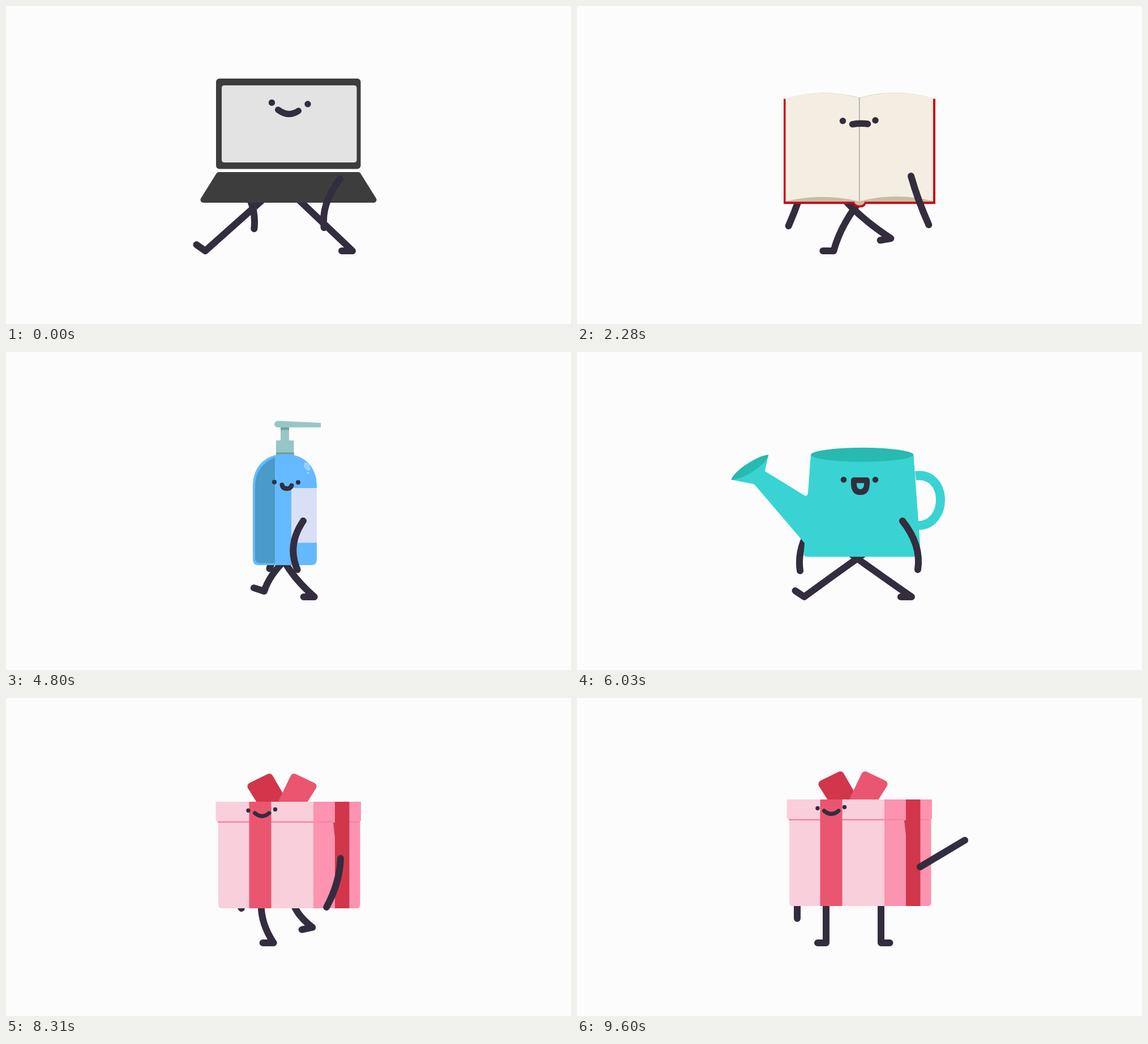
Recreate the animation shown at these times as an HTML page. Size 998x561 px, loop 9630 ms.

```html
<!DOCTYPE html>
<html lang="en">
<head>
<meta charset="utf-8">
<title>Walking things</title>
<style>
html, body { margin: 0; width: 100%; height: 100%; overflow: hidden; background: #fcfcfc; }
svg { display: block; width: 998px; height: 561px; }
.limb { fill: none; stroke: #332d3e; stroke-width: 12; stroke-linecap: round; stroke-linejoin: round; }
.face { fill: #332d3e; }
.face path { fill: none; stroke: #332d3e; stroke-linecap: round; stroke-linejoin: round; }
.round { stroke-linejoin: round; }
.body { display: none; }
</style>
</head>
<body>
<svg viewBox="0 0 998 561">
<g id="root">
  <path id="back" class="limb"/>

  <g id="laptop" class="body">
    <rect x="371" y="128" width="255.500" height="159.500" rx="6" fill="#3d3d3d"/>
    <rect x="381" y="140" width="238.500" height="136" rx="4.500" fill="#e3e3e3"/>
    <path class="round" d="M376 298H622L649.500 342H348.500Z" fill="#3d3d3d" stroke="#3d3d3d" stroke-width="10"/>
    <g class="face">
      <circle cx="469.500" cy="170.500" r="5.700"/><circle cx="533" cy="173" r="5.700"/>
      <path d="M480.500 183Q499 197 516.500 185" stroke-width="11"/>
    </g>
  </g>

  <g id="book" class="body">
    <path d="M365 142H633V327.500H510A10.500 6 0 0 1 488 327.500H365Z" fill="#c4071b"/>
    <path d="M369 323.500V142Q432 122 499 140Q563 122 629 141V323.500H508A9 6.500 0 0 1 490 323.500Z" fill="#c8bda4"/>
    <path d="M368.500 323V142Q432 122 499 140.500Q563 122 629 141V322Q560 306 499 323Q432 307 368.500 323Z" fill="#f4eee2"/>
    <path d="M498.800 140V323" stroke="#85837c"/>
    <g class="face">
      <circle cx="469.500" cy="181" r="5.700"/><circle cx="527" cy="180" r="5.700"/>
      <path d="M486.500 186.800Q500 184.500 513.500 186.200" stroke-width="11.500"/>
    </g>
  </g>

  <g id="bottle" class="body">
    <path d="M485 132H500V157H485Z M477 156H508.500V182H477Z" fill="#97c7c5"/>
    <path d="M485 133H500V137.500H485Z M477 177H508.500V182H477Z" fill="#719f9f"/>
    <path d="M480 121.500L556 125V133H479.500A5.700 5.700 0 0 1 480 121.500Z" fill="#97c7c5"/>
    <path d="M436 237C436 202 458 180 492.500 180S549 202 549 237V366Q549 376 539 376H446Q436 376 436 366Z" fill="#65b9fe"/>
    <path d="M475 186V372.500H449Q440 372 440 363V237Q440 201 475 186Z" fill="#4a9aca"/>
    <path d="M504 240H549V336.500H504Z" fill="#d9dff5"/>
    <g fill="#93d2fb">
      <ellipse cx="532" cy="202" rx="5" ry="8" transform="rotate(-30 532 202)"/>
      <circle cx="533.500" cy="213.500" r="2"/>
    </g>
    <g class="face">
      <circle cx="474" cy="229.500" r="4"/><circle cx="516" cy="230" r="4"/>
      <path d="M487.500 234.500Q489 241 496 241T504.500 235.500" stroke-width="8"/>
    </g>
  </g>

  <g id="can" class="body">
    <path d="M598 218C656 211 656 306 602 306" fill="none" stroke="#3ad3d3" stroke-width="16"/>
    <path d="M413 181H594.500L607 354Q607 361 600 361H407Q400 361 400.500 354L402 337L313 233L272.500 225L338 181L332 210L402 253Q407 255 408 248Z" fill="#3ad3d3"/>
    <path d="M272.500 225.500C274 212 318 182 338 181C340 192 300 224 272.500 225.500Z" fill="#28b9b0"/>
    <ellipse cx="503.700" cy="181" rx="90.500" ry="12.500" fill="#28b9b0"/>
    <g class="face">
      <circle cx="471" cy="225" r="5.300"/><circle cx="527" cy="225" r="5.300"/>
      <path d="M489 226H512V234Q511 247 500.500 247T489 234Z" stroke-width="10"/>
    </g>
  </g>

  <g id="gift" class="body">
    <path class="round" d="M433.500 152L465 136.500L482 166L480 178H450Z" fill="#d1364b" stroke="#d1364b" stroke-width="14"/>
    <path class="round" d="M509 136.500L541.500 152L525 178H489Z" fill="#ea566f" stroke="#ea566f" stroke-width="14"/>
    <path d="M375 214H543V367H381Q375 367 375 361Z M370.500 179H543V214H374Q370.500 214 370.500 210Z" fill="#f9cfdc"/>
    <path d="M543 214H625.500V361Q625.500 367 619 367H543Z M543 179H627V211Q627 214 624 214H543Z" fill="#fc93b0"/>
    <path d="M374 213.500H624V216H374Z" fill="#f487a6"/>
    <path d="M429.500 179H468.500V367H429.500Z" fill="#ea566f"/>
    <path d="M581 179H606.500V367H581Z M578 216H582V250Z" fill="#d1364b"/>
    <g class="face">
      <circle cx="425" cy="194.500" r="3.700"/><circle cx="472.500" cy="192.500" r="3.700"/>
      <path d="M436.500 199Q449 210 462 199" stroke-width="7"/>
    </g>
  </g>

  <path id="front" class="limb"/>
</g>
</svg>
<script>
const FRAME = 30, LOOP = 321 * FRAME, TURN = 64, STEP = 245, GROUND = 432;
const $ = id => document.getElementById(id);
const { sin, cos, PI, min, max, floor } = Math;
const mix = (a, b, k) => a + (b - a) * k;
const mix2 = (p, q, k) => [mix(p[0], q[0], k), mix(p[1], q[1], k)];
const ease = (a, b, t) => { const k = min(1, max(0, (t - a) / (b - a))); return k * k * (3 - 2 * k); };
const rad = d => d * PI / 180;

// Pairs are [left, right]. wave: [arm, base angle, swing, bend].
const cast = [
  { id: 'laptop', mid: 482, stride: 130, hips: [461, 510], hipY: 335, stand: [440, 551],
    arms: [[410, 305], [590, 305]], rest: [[385, 298], [620, 300]], len: [103, 93],
    wave: [0, 103, 18, 32], tilt: () => 1.7, bob: 1, face: [0, -15] },
  { id: 'book', mid: 487, stride: 110, hips: [463, 511], hipY: 330, stand: [440, 551],
    arms: [[405, 300], [590, 300]], rest: [[382, 305], [611, 308]], len: [86, 102],
    wave: [1, 137, 18, 5], hop: 20, bob: 2, dy: 20 },
  { id: 'bottle', mid: 492, stride: 89, hips: [494, 490], hipY: 366, stand: [465, 520],
    arms: [[455, 294], [525, 298]], rest: [[457, 290], [525, 298]], len: [82, 80],
    wave: [1, 125, 18, 8], hop: 4, bob: 5, dy: -3, near: true },
  { id: 'can', mid: 495, stride: 100, hips: [475, 515], hipY: 350, stand: [469, 529],
    arms: [[421, 298], [575, 298]], rest: [[421, 300], [575, 298]], len: [92, 92],
    tilt: t => 9 * sin(PI * max(0, t - 990) / 450) ** 2, bob: 4, near: true },
  { id: 'gift', mid: 486, stride: 131, hips: [452, 505], hipY: 350, stand: [440, 537],
    arms: [[391, 283], [591, 283]], rest: [[389, 298], [606, 298]], len: [91, 92],
    wave: [1, 136, 16, 0], bob: 4, face: [3, 0], near: true }
];
for (const c of cast) {
  c.body = $(c.id);
  c.mouth = c.body.querySelector('.face');
}

const curve = (a, b, c) => `M${a}Q${b} ${c}`;

function leg(c, i, s, k) {
  const n = min(3, floor(s)), u = s - n, swing = n % 2 !== i;
  let x, y = GROUND, toe;
  if (swing) {
    const lift = sin(PI * u) ** 2;
    x = c.mid + c.stride * (1 - 2 * u ** 1.55);
    y -= 28 * lift;
    toe = 35 * u - 28 * lift;
  } else {
    x = c.mid + c.stride * (2 * u - 1);
    toe = 35 * max(0, 1 - u / 0.2);
  }
  const hip = [mix(c.hips[i], c.stand[i], k), c.hipY];
  const ankle = mix2([x, y], [c.stand[i], GROUND], k);
  const foot = mix2([-19 * cos(rad(toe)), -19 * sin(rad(toe))], [i ? 15.5 : -15, 0], k);
  const knee = mix2(hip, ankle, 0.5);
  knee[0] -= 17 * sin(PI * u) * (1 - k);
  return curve(hip, knee, ankle) + `L${ankle[0] + foot[0]} ${ankle[1] + foot[1]}`;
}

function arm(c, i, s, k, t) {
  const side = i ? 1 : -1;
  const from = mix2(c.arms[i], c.rest[i], k);
  const reach = 35 * cos(PI * (s - 0.2));
  const bow = 12 * cos(PI * (s + 0.2));
  let angle = 0, bend = 0;
  if (c.wave && c.wave[0] === i) {
    const [, base, swing, curl] = c.wave, up = ease(980, 1190, t);
    angle = rad(up * (base + swing * sin(2 * PI * (t - 1170) / 400)));
    bend = up * curl;
  }
  const walkHand = [-side * reach, i ? 86 : 88];
  const restHand = [side * c.len[i] * sin(angle), c.len[i] * cos(angle)];
  const hand = mix2(walkHand, restHand, k);
  const walkElbow = -side * bow * 2 * (1 - k);
  const elbow = [
    from[0] + hand[0] / 2 + walkElbow - side * bend * cos(angle) * k,
    from[1] + hand[1] / 2 + bend * sin(angle) * k
  ];
  return curve(from, elbow, [from[0] + hand[0], from[1] + hand[1]]);
}

function draw(c, t) {
  const s = min(4, t / STEP), k = ease(965, 1110, t);
  const hop = t > 980 && c.hop ? c.hop * Math.abs(sin(PI * (t - 980) / 265)) : 0;
  const dy = (c.dy || 0) + c.bob * sin(PI * (s % 1)) * (1 - k);
  const tilt = c.tilt ? c.tilt(t) * k : 0;
  const face = c.face || [0, 0];

  for (const o of cast) o.body.style.display = o === c ? 'inline' : 'none';
  $('root').setAttribute('transform', `translate(0 ${-hop})`);
  c.body.setAttribute('transform', `translate(0 ${dy}) rotate(${tilt} 499 350)`);
  c.mouth.setAttribute('transform', `translate(${mix(face[0], face[1], k)} 0)`);

  const right = arm(c, 1, s, k, t), inFront = c.near || k < 0.5;
  $('back').setAttribute('d', leg(c, 0, s, k) + leg(c, 1, s, k) + arm(c, 0, s, k, t) + (inFront ? '' : right));
  $('front').setAttribute('d', inFront ? right : '');
}

// The opening pose is held for two frames.
const start = performance.now();
function tick() {
  const n = max(0, floor((performance.now() - start) % LOOP / FRAME) - 1);
  draw(cast[floor(n / TURN)], n % TURN * FRAME);
  requestAnimationFrame(tick);
}
tick();
</script>
</body>
</html>
```
